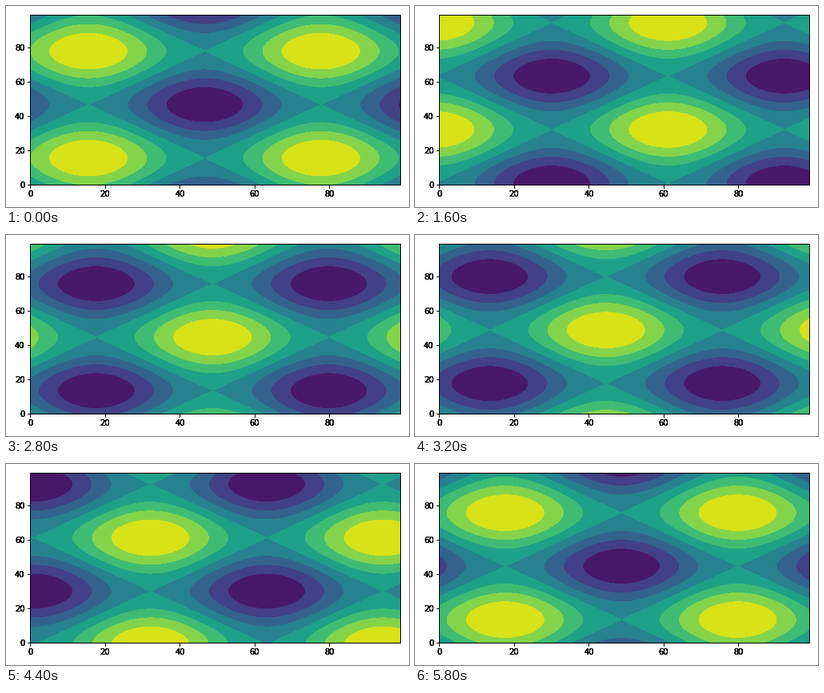
Write a matplotlib script that moves like this. It is 504x252 px and loops after 6000 ms.

```python
import numpy as np
import matplotlib.pyplot as plt
from matplotlib.animation import FuncAnimation

FRAMES = 30
INTERVAL = 200
TICKS = range(0, 100, 20)
LEVELS = np.linspace(-2, 2, 9)
OVERLAYS = 6

plt.rcParams["font.family"] = "DejaVu Sans"
plt.rcParams["font.size"] = 10

t = np.linspace(0, 10, 100)
X, Y = np.meshgrid(t, t)


def style(axes):
    axes.set(xlim=(0, 99), ylim=(0, 99), xticks=TICKS, yticks=TICKS)


fig, ax = plt.subplots(figsize=(7, 3.5), dpi=72)
style(ax)
fig.tight_layout()

# Stacked transparent axes give the heavy, solid frame and labels.
for i in range(OVERLAYS):
    top = fig.add_axes(ax.get_position(), label=f"overlay{i}")
    top.patch.set_visible(False)
    style(top)


def update(i):
    for old in list(ax.collections):
        old.remove()
    phase = 2 * np.pi * i / FRAMES
    ax.contourf(np.sin(X + phase) + np.sin(Y - phase), levels=LEVELS,
                cmap="viridis")
    return ax.collections


anim = FuncAnimation(fig, update, frames=FRAMES, interval=INTERVAL,
                     repeat=True, repeat_delay=0, blit=False)
plt.show()
```
